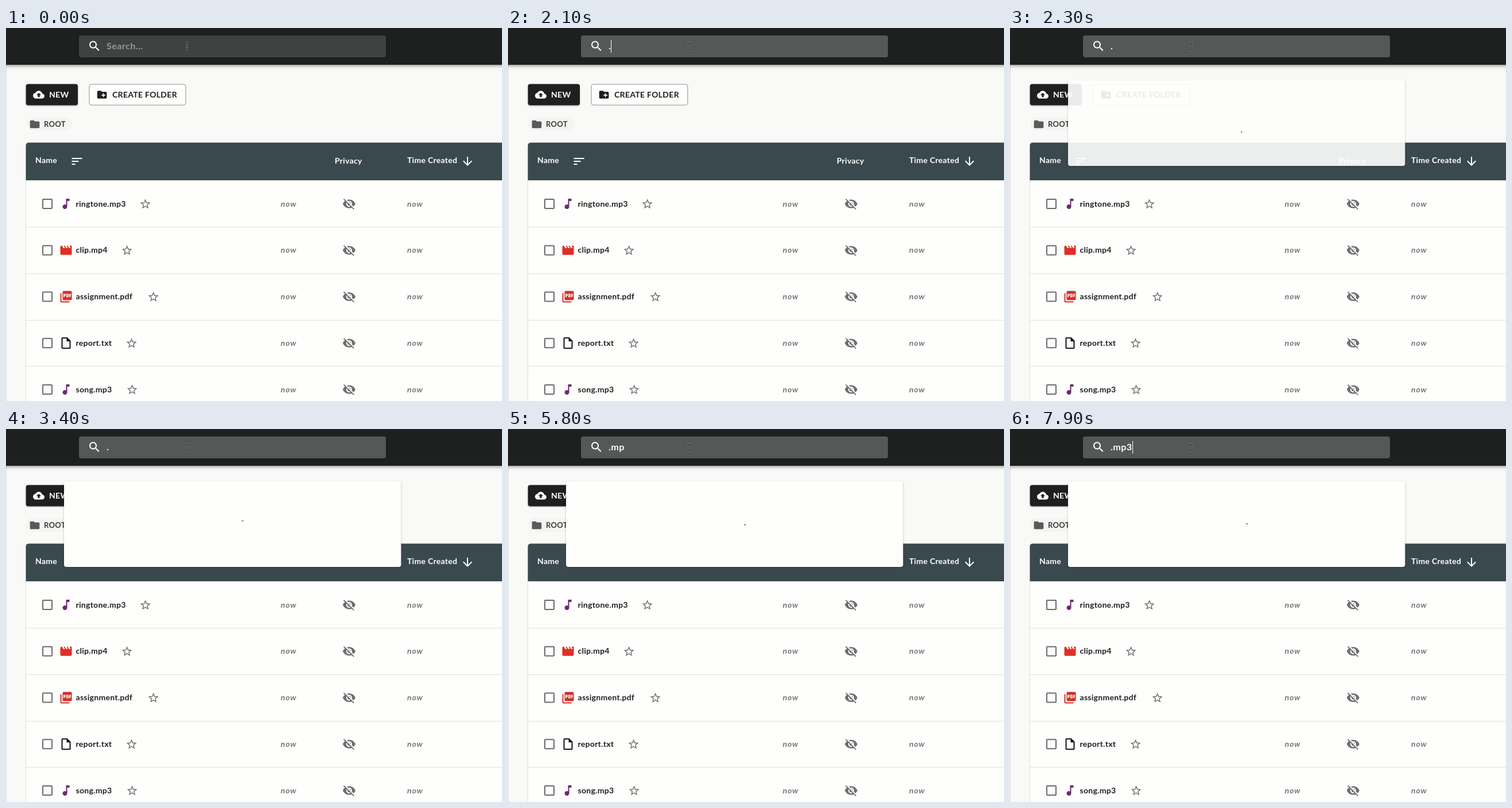
Recreate the animation shown at these times as an HTML page. Size 863x649 px, loop 8 s.

```html
<!DOCTYPE html>
<html lang="en">
<head>
<meta charset="utf-8">
<style>
  html, body { margin: 0; width: 100%; height: 100%; overflow: hidden; }
  svg { display: block; width: 863px; height: 649px; background: #f9f9f8; }
  text { font: 700 14px Lato, sans-serif; letter-spacing: .02em; fill: #1e201f; white-space: pre; }
  .big { font-size: 16px; letter-spacing: .03em; }
  .chip { font-size: 13px; fill: #3c3d3c; }
  .light { fill: #fefefd; }
  .muted { fill: #767676; letter-spacing: .04em; }
  .hint { fill: #959695; }
  .now { fill: #767676; font-style: italic; letter-spacing: .06em; }
  .raised { filter: drop-shadow(0 1px 1.5px #0004); }
  .bar { filter: drop-shadow(0 2px 2px #0003) drop-shadow(0 2px 3px #0003); }
</style>
</head>
<body>
<svg id="stage" viewBox="0 0 863 649"></svg>
<script>
const ICONS = {
  search: 'M15.5 14h-.79l-.28-.27C15.41 12.59 16 11.11 16 9.5 16 5.91 13.09 3 9.5 3S3 5.91 3 9.5 5.91 16 9.5 16c1.61 0 3.09-.59 4.23-1.57l.27.28v.79l5 4.99L20.49 19l-4.99-5zm-6 0C7.01 14 5 11.99 5 9.5S7.01 5 9.5 5 14 7.01 14 9.5 11.99 14 9.5 14z',
  upload: 'M19.35 10.04C18.67 6.59 15.64 4 12 4 9.11 4 6.6 5.64 5.35 8.04 2.34 8.36 0 10.91 0 14c0 3.31 2.69 6 6 6h13c2.76 0 5-2.24 5-5 0-2.64-2.05-4.78-4.65-4.96zM14 13v4h-4v-4H7l5-5 5 5h-3z',
  newFolder: 'M20 6h-8l-2-2H4c-1.11 0-1.99.89-1.99 2L2 18c0 1.11.89 2 2 2h16c1.11 0 2-.89 2-2V8c0-1.11-.89-2-2-2zm-1 8h-3v3h-2v-3h-3v-2h3V9h2v3h3v2z',
  folder: 'M10 4H4c-1.1 0-1.99.9-1.99 2L2 18c0 1.1.9 2 2 2h16c1.1 0 2-.9 2-2V8c0-1.1-.9-2-2-2h-8l-2-2z',
  sort: 'M3 18h6v-2H3v2zM3 6v2h18V6H3zm0 7h12v-2H3v2z',
  down: 'M20 12l-1.41-1.41L13 16.17V4h-2v12.17l-5.58-5.59L4 12l8 8 8-8z',
  box: 'M19 5v14H5V5h14m0-2H5c-1.1 0-2 .9-2 2v14c0 1.1.9 2 2 2h14c1.1 0 2-.9 2-2V5c0-1.1-.9-2-2-2z',
  star: 'M22 9.24l-7.19-.62L12 2 9.19 8.63 2 9.24l5.46 4.73L5.82 21 12 17.27 18.18 21l-1.63-7.03L22 9.24zM12 15.4l-3.76 2.27 1-4.28-3.32-2.88 4.38-.38L12 6.1l1.71 4.04 4.38.38-3.32 2.88 1 4.28L12 15.4z',
  hidden: 'M12 7c2.76 0 5 2.24 5 5 0 .65-.13 1.26-.36 1.83l2.92 2.92c1.51-1.26 2.7-2.89 3.43-4.75-1.73-4.39-6-7.5-11-7.5-1.4 0-2.74.25-3.98.7l2.16 2.16C10.74 7.13 11.35 7 12 7zM2 4.27l2.28 2.28.46.46C3.08 8.3 1.78 10.02 1 12c1.73 4.39 6 7.5 11 7.5 1.55 0 3.03-.3 4.38-.84l.42.42L19.73 22 21 20.73 3.27 3 2 4.27zM7.53 9.8l1.55 1.55c-.05.21-.08.43-.08.65 0 1.66 1.34 3 3 3 .22 0 .44-.03.65-.08l1.55 1.55c-.67.33-1.41.53-2.2.53-2.76 0-5-2.24-5-5 0-.79.2-1.53.53-2.2zm4.31-.78l3.15 3.15.02-.16c0-1.66-1.34-3-3-3l-.17.01z',
  mp3: 'M12 3v10.55c-.59-.34-1.27-.55-2-.55-2.21 0-4 1.79-4 4s1.79 4 4 4 4-1.79 4-4V7h4V3h-6z',
  mp4: 'M18 4l2 4h-3l-2-4h-2l2 4h-3l-2-4H8l2 4H7L5 4H4c-1.1 0-1.99.9-1.99 2L2 18c0 1.1.9 2 2 2h16c1.1 0 2-.9 2-2V4h-4z',
  pdf: 'M20 2H8c-1.1 0-2 .9-2 2v12c0 1.1.9 2 2 2h12c1.1 0 2-.9 2-2V4c0-1.1-.9-2-2-2zm-8.5 7.5c0 .83-.67 1.5-1.5 1.5H9v2H7.5V7H10c.83 0 1.5.67 1.5 1.5v1zm5 2c0 .83-.67 1.5-1.5 1.5h-2.5V7H15c.83 0 1.5.67 1.5 1.5v3zm4-3H19v1h1.5V11H19v2h-1.5V7h3v1.5zM9 9.5h1v-1H9v1zM4 6H2v14c0 1.1.9 2 2 2h14v-2H4V6zm10 5.5h1v-3h-1v3z',
  txt: 'M14 2H6c-1.1 0-1.99.9-1.99 2L4 20c0 1.1.89 2 1.99 2H18c1.1 0 2-.9 2-2V8l-6-6zM6 20V4h7v5h5v11H6z',
  jpg: 'M21 19V5c0-1.1-.9-2-2-2H5c-1.1 0-2 .9-2 2v14c0 1.1.9 2 2 2h14c1.1 0 2-.9 2-2zM8.5 13.5l2.5 3.01L14.5 12l4.5 6H5l3.5-4.5z',
};
const COLORS = { mp3: '#6c2a70', mp4: '#df3026', pdf: '#d32f2a', txt: '#111', jpg: '#c74cc6' };
const FILES = ['ringtone.mp3', 'clip.mp4', 'assignment.pdf', 'report.txt', 'song.mp3', 'wallpaper.jpg',
  '61p8cUIuOOL._AC_UL320_.jpg', '61Pvw-l-0FL._AC_UL320_.jpg', '81Xnm-8a4L._AC_UL320_.jpg'];
const STAR_X = [242.5, 210.5, 256.5, 218.5, 219.5];
const OWNER = 'opalbrookhamster';

// Icons are placed by their centre.
const icon = (name, x, y, fill, size = 24) =>
  `<path d="${ICONS[name]}" fill="${fill}" transform="translate(${x - size / 2} ${y - size / 2}) scale(${size / 24})"/>`;
const text = (str, x, y, cls = '') => `<text x="${x}" y="${y}" class="${cls}">${str}</text>`;
const rect = (x, y, w, h, fill, rest = '') =>
  `<rect x="${x}" y="${y}" width="${w}" height="${h}" fill="${fill}" ${rest}/>`;
const type = name => name.split('.').pop();

const tableRow = (name, i) => {
  const y = 306 + i * 80.75;
  return icon('box', 72, y, '#6b6b6b') + icon(type(name), 104.5, y, COLORS[type(name)]) +
    text(name, 121.5, y + 4.5) + icon('star', STAR_X[i], y + .3, '#6f6f6f', 21.5) +
    text('now', 478, y + 4.5, 'now') + icon('hidden', 597, y, '#6f6f6f') + text('now', 698, y + 4.5, 'now') +
    rect(35, Math.round(346 + i * 80.75), 828, 1, '#e0e0df');
};

const resultRow = (name, i) => {
  const y = 88.4 + i * 71.8;
  const fill = type(name) === 'txt' ? '#fefefd' : COLORS[type(name)];
  return `<circle cx="136.7" cy="${y}" r="19.8" fill="#3c3230"/>` + icon(type(name), 136.7, y, fill) +
    text(name, 172.5, y - 4.5, 'big') + text(OWNER, 172.5, y + 17, 'muted');
};

const IBEAM = 'M313 26.5h4M313 37.5h4M315 26.5V37.5';

document.getElementById('stage').innerHTML =
  rect(0, 64, 1, 585, '#dededd') +
  rect(34.7, 97.6, 90.3, 36.8, '#1e201f', 'rx="4" class="raised"') +
  icon('upload', 57, 116, '#fefefd', 20) + text('NEW', 75, 121, 'light') +
  rect(144.9, 97.9, 167.8, 36.2, '#fefefd', 'rx="4" stroke="#8d8e8d"') +
  icon('newFolder', 167, 116, '#1e201f', 20) + text('CREATE FOLDER', 185, 121) +
  rect(35, 155, 80, 24, '#f4f4f3', 'rx="12"') +
  icon('folder', 50, 167.5, '#595a59', 20) + text('ROOT', 66, 171.5, 'chip') +
  rect(34.5, 199.5, 850, 480, '#fefefd', 'rx="5" stroke="#dededd"') +
  '<path d="M34.6 265V204.4a5 5 0 0 1 5-5H863V265Z" fill="#3a494e"/>' +
  text('Name', 51, 235, 'light') + icon('sort', 123.5, 232, '#fefefd') +
  text('Privacy', 572, 236, 'light') + text('Time Created', 698, 235, 'light') + icon('down', 803, 232, '#fefefd') +
  FILES.slice(0, 5).map(tableRow).join('') +
  `<g id="loading">${rect(101, 91, 586.4, 149, '#fefefd', 'rx="4" class="raised"')}
    <path id="spinner" d="M410.7 165h3.3" stroke="#1e201f" stroke-width="1"/></g>` +
  `<g id="results">${rect(101, 40, 586.4, 640, '#fefefd', 'class="raised"')}
    ${FILES.map(resultRow).join('')}
    ${rect(675.6, 40, 11.8, 640, '#cacac9')}${rect(678.6, 40, 5.8, 446, '#7f7f7e', 'rx="2.9"')}</g>` +
  rect(-10, -10, 883, 74, '#1e201f', 'class="bar"') +
  rect(127, 13, 534, 38, '#404241', 'rx="4" id="field"') +
  icon('search', 154, 31.5, '#fefefd') +
  '<text id="query" x="175" y="37"></text>' +
  rect(0, 21, 1, 22, '#fefefd', 'id="caret"') +
  `<g id="pointer" fill="none"><path d="${IBEAM}" stroke="#d8d8d8" stroke-width="2.4"/>
    <path d="${IBEAM}" stroke="#111" stroke-width="1.4"/></g>`;

const [loading, spinner, results, field, query, caret, pointer] =
  ['loading', 'spinner', 'results', 'field', 'query', 'caret', 'pointer'].map(id => document.getElementById(id));
const show = (el, on) => el.setAttribute('visibility', on ? 'visible' : 'hidden');
const smooth = x => x * x * (3 - 2 * x);

function draw(t) {
  const typed = t < 2100 ? '' : t < 5800 ? '.' : t < 7900 ? '.mp' : '.mp3';
  query.textContent = typed || 'Search...';
  query.setAttribute('class', typed ? 'big light' : 'big hint');
  field.setAttribute('fill', t < 200 ? '#404241' : '#565857');
  show(caret, (t >= 200 && t < 700) || (t >= 2100 && t < 2300) || t >= 7900);
  caret.setAttribute('x', { '': 175, '.': 179, '.mp': 203, '.mp3': 213 }[typed]);
  pointer.setAttribute('transform', `translate(0 ${t < 1100 ? -1 : 0})`);

  const listed = t >= 3500 && t < 5800;
  show(results, listed);
  show(loading, t >= 2200 && !listed);
  loading.setAttribute('opacity', smooth(Math.min(1, Math.max(0, (t - 2100) / 245))));
  const started = t < 5800 ? 2063 : t < 7900 ? 5780 : 7900;
  spinner.setAttribute('transform', `rotate(${(t - started) / 1400 * 360} 394 165)`);
}

// The picture advances in steps of 100 ms.
function tick() {
  draw(Math.floor(performance.now() % 8000 / 100) * 100);
  requestAnimationFrame(tick);
}
tick();
</script>
</body>
</html>
```
